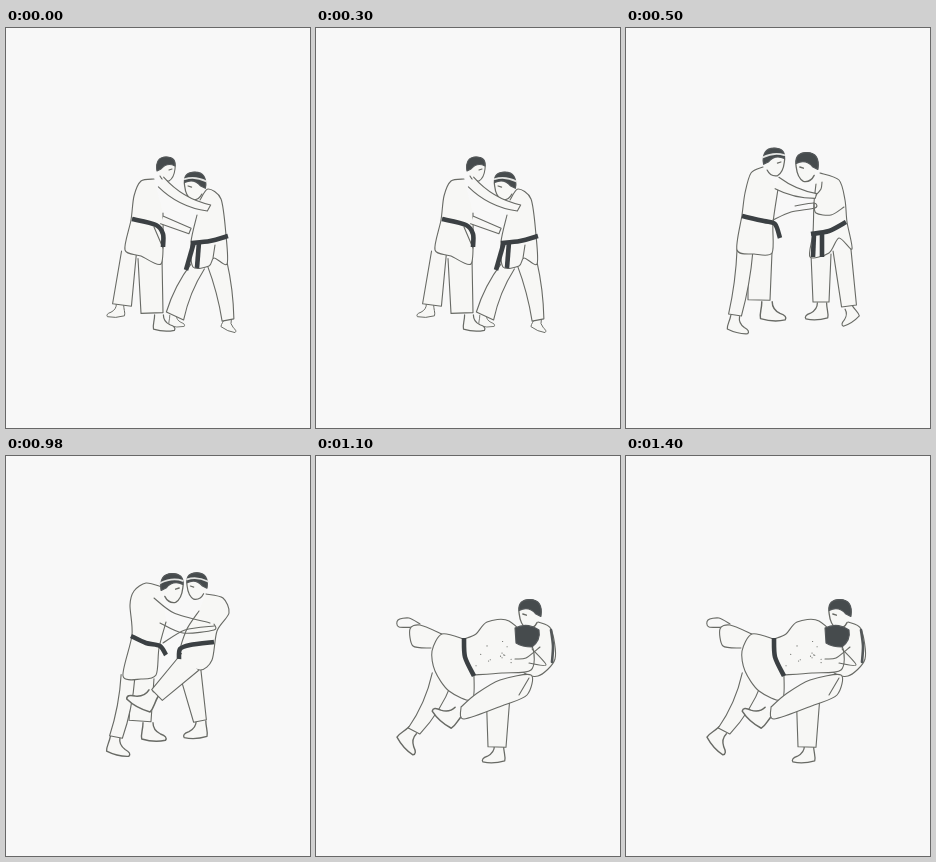
An HTML page that plays this animation: 304x400 px, repeating every 1.6 s.

```html
<!DOCTYPE html>
<html lang="en">
<head>
<meta charset="utf-8">
<title>Judo throw</title>
<style>
  html, body { margin: 0; width: 100%; height: 100%; overflow: hidden; background: #f8f8f8; }
  svg { display: block; width: 100%; height: 100%; }
  path { fill: none; stroke: #686a65; stroke-width: 1.1; stroke-linecap: round; stroke-linejoin: round; }
  .cloth { fill: #f7f7f5; }
  .hair { fill: #464b4d; stroke: #54585a; }
  .belt { stroke: #3b4043; stroke-width: 4.6; stroke-linecap: butt; }
  .band { stroke: #e4e5e3; stroke-width: 1.5; }
  .shade { stroke: #54585a; stroke-width: 2.6; }
</style>
</head>
<body>
<svg id="stage" viewBox="0 0 304 400"></svg>
<script>
const LOOP = 1600;
const starts = [0, 500, 800, 1100];
const stage = document.getElementById('stage');
const make = (tag, parent) =>
  parent.appendChild(document.createElementNS('http://www.w3.org/2000/svg', tag));

let pose;
function draw(kind, d, transform = '') {
  const path = make('path', pose);
  path.setAttribute('class', kind);
  path.setAttribute('d', d);
  path.setAttribute('transform', transform);
}

// Smooth curve through a few points, written as "x,y x,y ..."
function curve(text) {
  const p = text.split(' ').map(pair => pair.split(',').map(Number));
  let d = `M${p[0]}`;
  for (let i = 0; i < p.length - 1; i++) {
    const a = p[i - 1] || p[i], b = p[i], c = p[i + 1], e = p[i + 2] || c;
    const near = b.map((v, k) => v + (c[k] - a[k]) / 7);
    const far = c.map((v, k) => v - (e[k] - b[k]) / 7);
    d += `C${near} ${far} ${c}`;
  }
  return d;
}
const pen = kind => text => draw(kind, curve(text));
const line = pen('line'), cloth = pen('cloth'), belt = pen('belt'), shade = pen('shade');

// Tapered sleeve or trouser leg, open at its start and cut straight at its end
function limb(x0, y0, w0, x1, y1, w1, bend = 0) {
  const length = Math.hypot(x1 - x0, y1 - y0);
  const nx = (y0 - y1) / length, ny = (x1 - x0) / length;
  const off = (x, y, by) => `${x + nx * by},${y + ny * by}`;
  const mid = by => off((x0 + x1) / 2, (y0 + y1) / 2, bend + by);
  const w = (w0 + w1) / 4;
  draw('cloth', `M${off(x0, y0, w0 / 2)} Q${mid(w)} ${off(x1, y1, w1 / 2)}
    L${off(x1, y1, -w1 / 2)} Q${mid(-w)} ${off(x0, y0, -w0 / 2)}`);
}

// A negative size points the toes to the left
function foot(x, y, size, turn = 0) {
  draw('cloth', 'M-4,-1 C-4,5 -6,8 -5,12 Q5,15 14,13 Q16,10 10,8 Q4,5 4,-1',
    `translate(${x} ${y}) rotate(${turn}) scale(${size} ${Math.abs(size)})`);
}

function head(x, y, size, banded) {
  const place = `translate(${x} ${y}) scale(${size} ${Math.abs(size)})`;
  draw('cloth', 'M-9,1 C-12,-15 12,-17 9,0 Q8,9 3,12 Q-3,13 -6,7', place);
  draw('hair', 'M-9,2 Q-11,-12 0,-12 Q10,-12 9,-3 Q1,-7 -5,0 Z', place);
  draw('line', 'M3,1 L6,0', place);
  if (banded) draw('band', 'M-10,-4 Q0,-9 9,-6', place);
}

function grip() {
  // right fighter
  foot(167, 288, .8);
  foot(222, 291, .8, 20);
  limb(192, 238, 14, 169, 288, 19, 5);
  limb(211, 235, 20, 222, 292, 12, -3);
  cloth('194,172 202,161 215,171 220,207 221,236 208,230 203,238 187,239 185,214 191,187');
  line('209,217 207,230');
  head(189, 158, -1.15, true);
  belt('222,208 204,213 185,215');
  belt('188,214 180,242');
  belt('193,214 191,240');
  // left fighter
  foot(114, 277, -.9);
  foot(153, 288, 1.1);
  limb(123, 224, 15, 116, 277, 19);
  limb(144, 230, 24, 146, 285, 22);
  head(160, 141, 1);
  cloth('148,151 135,153 128,168 125,192 119,222 135,228 155,236 157,205 157,185');
  line('148,199 157,220');
  belt('126,191 150,197 157,206 157,219');
  limb(156, 192, 8, 184, 203, 6);
  limb(155, 154, 11, 203, 180, 7, 9);
}

function balance() {
  // right fighter
  foot(196, 276, -1.15);
  foot(223, 280, -1, -30);
  limb(195, 226, 20, 195, 274, 16);
  limb(216, 222, 18, 223, 278, 15);
  cloth('194,145 213,152 219,172 221,194 226,221 213,210 203,225 184,229 187,205 188,175 190,156');
  line('188,175 190,185 205,187 218,179');
  head(181, 139, -1.2);
  belt('220,194 203,203 185,206');
  belt('188,206 187,229');
  belt('196,205 196,229');
  // left fighter
  foot(141, 275, 1.3);
  limb(134, 224, 24, 133, 272, 22);
  foot(109, 289, 1.1, 10);
  limb(119, 222, 16, 109, 287, 13, -3);
  cloth('137,139 125,145 119,165 116,187 111,222 128,226 146,225 147,195 152,161');
  head(148, 134, 1.15, true);
  belt('116,188 138,193 149,196 154,210');
  limb(151, 155, 12, 190, 168, 5, 5);
  line('190,167 195,161 196,154');
  line('147,192 165,184 189,180 188,175 169,178');
}

function step() {
  // standing legs
  foot(195, 266, -1.2);
  limb(184, 215, 22, 194, 265, 13);
  foot(142, 268, 1.25);
  limb(137, 222, 22, 134, 265, 22);
  foot(109, 282, 1.2, 10);
  limb(122, 220, 14, 110, 281, 13, -4);
  // left fighter
  cloth('156,131 140,127 128,135 124,149 126,179 117,220 135,223 150,219 153,192 160,166');
  head(166, 132, 1.2, true);
  belt('125,180 140,187 154,190 160,199');
  // right fighter
  cloth('200,138 217,142 223,157 211,175 206,204 194,214 174,202 180,175 193,155');
  foot(147, 238, -1.4, 32);
  limb(184, 206, 24, 151, 239, 15);
  head(191, 130, -1.1, true);
  belt('208,186 184,189 174,193 173,203');
  // sleeves
  line('148,142 168,157 204,167');
  line('154,167 177,177 208,174 208,168');
  line('157,187 179,174 208,170');
}

function sweep() {
  // rear fighter
  foot(183, 291, -1.15);
  limb(182, 246, 23, 181, 291, 18);
  cloth('222,166 235,173 239,203 222,220 205,213 205,180');
  shade('235,174 237,190 236,206');
  head(214, 158, -1.2);
  // front fighter
  foot(96, 275, 1.25, 45);
  limb(126, 222, 22, 98, 275, 13, -6);
  line('104,168 93,162 82,164 83,171 104,171');
  cloth('126,178 104,169 94,173 97,190 115,192');
  cloth('148,183 160,178 171,166 193,165 216,190 215,214 186,217 158,219');
  cloth('148,183 126,178 116,195 119,215 133,235 156,244 158,219');
  belt('148,182 149,201 158,220');
  draw('hair', 'M-12,-8 Q0,-14 12,-6 Q14,4 5,11 Q-5,11 -11,7 Z', 'translate(211 180)');
  line('199,203 210,202 224,191');
  line('216,193 230,209 213,207');
  specks(14);
  // lifted leg
  foot(142, 256, -1.35, 45);
  cloth('145,251 160,238 184,224 215,219 211,239 188,249 148,263 145,251');
  line('203,239 213,222');
}

function specks(count) {
  let seed = 7;
  const random = () => (seed = seed * 16807 % 2147483647) / 2147483647;
  for (let i = 0; i < count; i++) draw('line', `M${160 + 38 * random()},${184 + 28 * random()}h.1`);
}

[grip, balance, step, sweep].forEach((drawPose, i) => {
  pose = make('g', stage);
  drawPose();
  const frames = [...starts, LOOP].map((time, j) => ({
    opacity: j % starts.length === i ? 1 : 0,
    offset: time / LOOP,
    easing: 'step-end'
  }));
  pose.animate(frames, { duration: LOOP, iterations: Infinity });
});
</script>
</body>
</html>
```
